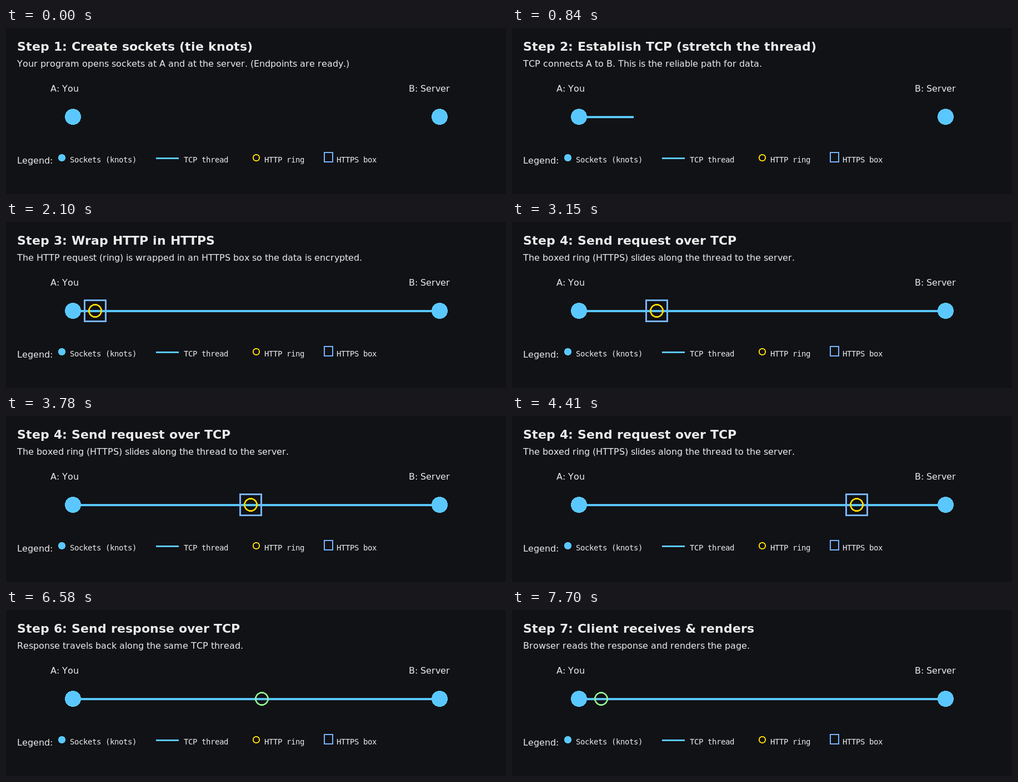
An HTML page with a canvas for the animation above (8.54 s loop, 900x300 px).

```html
<!DOCTYPE html>
<html lang="en">
<head>
<meta charset="utf-8">
<title>Sockets, TCP and HTTPS</title>
<style>
  html, body { margin: 0; width: 100%; height: 100%; overflow: hidden; background: #111216; }
  canvas { display: block; }
</style>
</head>
<body>
<canvas id="stage" width="900" height="300"></canvas>
<script>
const ctx = document.getElementById('stage').getContext('2d');

const TICK = 70, LOOP = 122;
const BG = '#111216', INK = '#ebebeb', BLUE = '#5ac8ff';
const GOLD = '#ffd700', GREEN = '#90ee90', BOX = '#78b4ff';
const A = 120, B = 780, Y = 160;
const NEAR_A = A + 40, NEAR_B = B - 40, SPEED = 20;

const TITLE = 'bold 22px "DejaVu Sans", sans-serif';
const BODY = '16px "DejaVu Sans", sans-serif';
const MONO = '14px "DejaVu Sans Mono", monospace';

// start is in ticks; each pose gets the ticks since its start
const steps = [
  { start: 0, title: 'Step 1: Create sockets (tie knots)',
    text: 'Your program opens sockets at A and at the server. (Endpoints are ready.)',
    pose: () => ({ end: A }) },
  { start: 10, title: 'Step 2: Establish TCP (stretch the thread)',
    text: 'TCP connects A to B. This is the reliable path for data.',
    pose: i => ({ end: A + (B - A) * (i + 1) / 20 }) },
  { start: 30, title: 'Step 3: Wrap HTTP in HTTPS',
    text: 'The HTTP request (ring) is wrapped in an HTTPS box so the data is encrypted.',
    pose: () => ({ ring: NEAR_A, color: GOLD, boxed: true }) },
  { start: 40, title: 'Step 4: Send request over TCP',
    text: 'The boxed ring (HTTPS) slides along the thread to the server.',
    pose: i => ({ ring: NEAR_A + SPEED * i, color: GOLD, boxed: true }) },
  { start: 70, title: 'Step 5: Server handles request',
    text: 'Server reads the request and prepares a response.',
    pose: () => ({ ring: NEAR_B, color: GREEN }) },
  { start: 80, title: 'Step 6: Send response over TCP',
    text: 'Response travels back along the same TCP thread.',
    pose: i => ({ ring: NEAR_B - SPEED * i, color: GREEN }) },
  { start: 110, title: 'Step 7: Client receives & renders',
    text: 'Browser reads the response and renders the page.',
    pose: () => ({ ring: NEAR_A, color: GREEN }) }
];

// Glyphs advance by whole pixels, as in hinted text.
function write(str, x, y, font) {
  ctx.font = font;
  ctx.fillStyle = INK;
  for (const ch of str) {
    ctx.fillText(ch, x, y);
    x += Math.round(ctx.measureText(ch).width);
  }
}

// Hard-edged disc, or a ring when a line width is given.
function circle(cx, cy, r, color, line = r + 1) {
  const outer = r + 0.5, inner = outer - line;
  ctx.fillStyle = color;
  for (let y = -r; y <= r; y++) {
    for (let x = -r; x <= r; x++) {
      const d = Math.hypot(x, y);
      if (d <= outer && d > inner) ctx.fillRect(cx + x, cy + y, 1, 1);
    }
  }
}

function bar(x1, x2, y, h) {
  ctx.fillStyle = BLUE;
  ctx.fillRect(x1, y, Math.round(x2) - x1, h);
}

function frame(x, y, w, h, line) {
  ctx.strokeStyle = BOX;
  ctx.lineWidth = line;
  ctx.strokeRect(x + line / 2, y + line / 2, w - line, h - line);
}

function legend() {
  write('Legend:', 20, 245, BODY);
  circle(100, 234, 6, BLUE);
  write('Sockets (knots)', 115, 243, MONO);
  bar(270, 311, 234, 3);
  write('TCP thread', 320, 243, MONO);
  circle(450, 234, 6, GOLD, 2);
  write('HTTP ring', 465, 243, MONO);
  frame(572, 224, 17, 19, 2);
  write('HTTPS box', 595, 243, MONO);
}

function draw(tick) {
  const step = steps.findLast(s => s.start <= tick);
  const { end = B, ring, color, boxed } = step.pose(tick - step.start);

  ctx.fillStyle = BG;
  ctx.fillRect(0, 0, 900, 300);
  write(step.title, 20, 41, TITLE);
  write(step.text, 20, 70, BODY);
  write('A: You', 80, 115, BODY);
  write('B: Server', 725, 115, BODY);

  bar(A, end, Y - 1, 4);
  circle(A, Y, 14, BLUE);
  circle(B, Y, 14, BLUE);
  if (boxed) frame(ring - 20, Y - 20, 41, 41, 3);
  if (ring) circle(ring, Y, 12, color, 3);
  legend();
}

let shown = -1;
const origin = performance.now();

function play() {
  const tick = Math.floor((performance.now() - origin) / TICK) % LOOP;
  if (tick !== shown) draw(shown = tick);
  requestAnimationFrame(play);
}
play();
</script>
</body>
</html>
```
